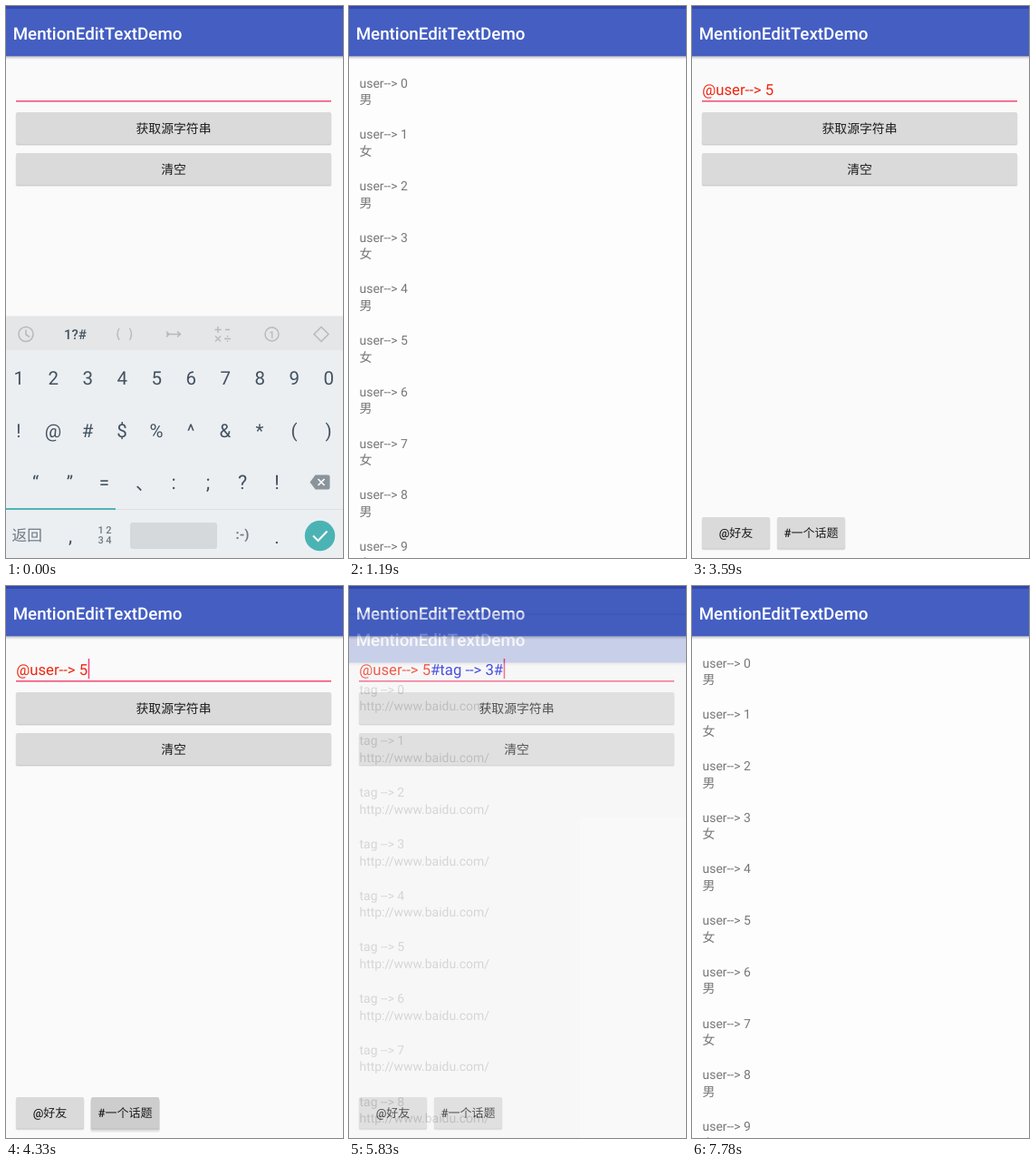
These frames come from a looping animation (372 px wide and 608 px high, 8 s). An HTML page:

```html
<!DOCTYPE html>
<html lang="zh-CN">
<head>
<meta charset="utf-8">
<style>
  html, body { margin: 0; width: 100%; height: 100%; overflow: hidden; background: #fafafa; }
  svg {
    display: block; text-rendering: geometricPrecision;
    font-family: Roboto, "Noto Sans CJK SC", "Noto Sans CJK", sans-serif;
  }
</style>
</head>
<body>
<svg id="stage" width="372" height="608" viewBox="0 0 372 608"></svg>
<script>
const stage = document.getElementById('stage');

const text = (x, y, size, str, fill, more = '') =>
  `<text x="${x}" y="${y}" font-size="${size}" fill="${fill}" ${more}>${str}</text>`;
const mid = (x, y, size, str, fill, more = '') =>
  text(x, y, size, str, fill, 'text-anchor="middle" ' + more);
const rect = (x, y, w, h, fill, more = '') =>
  `<rect x="${x}" y="${y}" width="${w}" height="${h}" fill="${fill}" ${more}/>`;
const line = (d, color, width = 1.3) =>
  `<path d="${d}" fill="none" stroke="${color}" stroke-width="${width}"/>`;

const header = () =>
  rect(0, 55, 372, 4, 'url(#shade)') + rect(0, 0, 372, 55.3, '#445ec2') +
  rect(0, 0, 372, 3, '#3349ab') +
  text(7.7, 37, 18.75, 'MentionEditTextDemo', '#fff', 'font-weight="500"');

const button = (x, y, w, h, label, size, id = '') =>
  rect(x - .5, y + 1, w + 1, h + 1, '#000', 'rx="2" opacity=".07"') +
  rect(x, y + .5, w, h + .5, '#000', 'rx="2" opacity=".12"') +
  rect(x, y, w, h, '#dadada', 'rx="2"') +
  (id && `<g id="${id}" opacity="0">` +
    rect(x - 1, y + 2, w + 2, h + 2, '#000', 'rx="3" opacity=".13"') +
    rect(x, y, w, h, '#c6c6c6', 'rx="2"') + '</g>') +
  mid(x + w / 2, y + h / 2 + size * .37, size, label, '#1c1c1c', 'font-weight="500"');

const list = (id, first, second) => {
  let rows = '';
  for (let i = 0; i < 10; i++) {
    const y = 89.5 + i * 56.72;
    rows += text(11.5, y, 13.94, first + i, '#777') + text(11.5, y + 18.6, 13.94, second(i), '#777');
  }
  return `<g id="${id}" opacity="0">${rect(0, 0, 372, 608, '#fdfdfd')}${rows}${header()}</g>`;
};

function keyboard() {
  const ink = '#435261', soft = '#b4babe', dim = '#6d7983';
  const keys = (chars, x, y, size) => chars.map((c, i) => mid(x + i * 38, y, size, c, ink)).join('');
  return rect(0, 341, 372, 1, '#000', 'opacity=".04"') +
    rect(0, 342, 372, 266, '#eceff2') + rect(0, 342, 372, 37, '#e4e6e8') +
    // tool strip
    `<circle cx="22" cy="361.5" r="8" fill="none" stroke="${soft}" stroke-width="1.5"/>` +
    line('M22 356.5V362L26 364.5', soft, 1.5) +
    mid(76.5, 367, 15, '1?#', ink, 'font-weight="500"') +
    line('M125 355q-4 6.5 0 13M136.5 355q4 6.5 0 13', soft) +
    line('M177 358.5l3 3-3 3M177 361.5H192M189 358.5l3.5 3-3.5 3', soft, 1.5) +
    line('M230.5 356.5h7M234 353v7M242 356.5h5M231 363.5l6 6M237 363.5l-6 6M241 366.5h7M244.5 363v1.5M244.5 368.5v1.5', soft) +
    `<circle cx="293.5" cy="361.5" r="7.5" fill="none" stroke="${soft}" stroke-width="1.4"/>` +
    mid(293.5, 365.5, 11, '1', soft, 'font-weight="500"') +
    line('M348 353.5l8 8-8 8-8-8z', soft, 1.5) +
    // key rows
    keys([...'1234567890'], 14.2, 417, 20.5) +
    keys(['!', '@', '#', '$', '%', '^', '&amp;', '*', '(', ')'], 14, 475, 20.5) +
    keys(['“', '”', '='], 32.5, 532, 20.5) + text(143, 533, 20, '、', ink) +
    keys([':', ';', '?', '!'], 185, 532, 21.5) +
    `<path d="M335.5 524.5l6-8h14q2 0 2 2v12q0 2-2 2h-14z" fill="#8a949b"/>` +
    line('M344.5 521l7 7M351.5 521l-7 7', '#fff', 1.7) +
    // bottom row
    rect(0, 554, 372, 1, '#dde1e4') + rect(0, 553, 121, 2, '#4fb6b7') +
    text(6.5, 589, 16.7, '返回', dim) + mid(71, 591, 21, ',', ink) +
    mid(109, 581, 11, '1 2', dim, 'font-weight="500"') +
    mid(109, 592, 11, '3 4', dim, 'font-weight="500"') +
    rect(137, 569, 96, 29, '#d5d9dc', 'rx="3"') +
    mid(261, 587, 14.5, ':-)', dim, 'font-weight="700"') + mid(299, 592, 21, '.', ink) +
    `<circle cx="346.5" cy="583.5" r="16.7" fill="#4cb3b5"/>` +
    line('M339 583.5l5.5 5.5 10-10.5', '#fff', 2);
}

stage.innerHTML =
  `<defs><linearGradient id="shade" x2="0" y2="1"><stop stop-opacity=".24"/><stop offset="1" stop-opacity="0"/></linearGradient></defs>` +
  rect(0, 0, 372, 608, '#fafafa') + header() +
  `<text x="11.3" y="97.5" font-size="16.7"><tspan id="user" fill="#f0260f"></tspan><tspan id="tag" fill="#0a14dc"></tspan></text>` +
  rect(11, 104, 348, 1.6, '#f4547f') + rect(0, 80, 1.5, 22, '#f4407a', 'id="caret"') +
  button(11, 117, 348, 35, '获取源字符串', 13.85) + button(11, 162, 348, 35, '清空', 13.85) +
  button(11, 563, 75, 34.5, '@好友', 13, 'press0') + button(94, 563, 75, 34.5, '#一个话题', 13, 'press1') +
  `<g id="keys">${keyboard()}</g>` +
  rect(0, 0, 372, 608, '#000', 'id="dim" opacity="0"') +
  list('users', 'user--&gt; ', i => i % 2 ? '女' : '男') +
  list('tags', 'tag --&gt; ', () => 'http://www.baidu.com/');

const $ = id => document.getElementById(id);
const clamp = v => Math.min(1, Math.max(0, v));
const place = (id, y, alpha) => {
  $(id).setAttribute('transform', `translate(0 ${y})`);
  $(id).setAttribute('opacity', alpha);
};

// The screen refreshes in 150 ms ticks
const snap = t => {
  if (t < 440) return 0;
  const from = t < 4630 ? 440 : 4630;
  return from + Math.floor((t - from) / 150) * 150;
};

const opened = [1190, 4630, 7780];
const closed = [2170, 5636];
const caretOn = [[440, 940], [2140, 2540], [3140, 3590], [4040, 4490], [5580, 6130], [6580, 7180]];

// A list rises and fades in, later drops and fades out
function slide(id, t, open, close) {
  if (t < close) {
    const dt = t - open + 290;
    place(id, 48.6 * (1 - clamp(dt / 350)) ** 5, 1 - (1 - clamp(dt / 200)) ** 2);
  } else {
    const dt = t - close;
    place(id, 48.6 * clamp(dt / 250) ** 2, clamp((224 - dt) / 120));
  }
}

const press = (t, end) => t < end + 150 ? clamp((t - end + 600) / 250) : 0;

// The main screen brightens while a list leaves
const dimming = (t, close) => t < close ? 0 : .3 * (1 - clamp((t - close) / 250)) ** 2;

function draw(t) {
  const hide = clamp((t - 360) / 200);
  place('keys', 60 * hide * hide, 1 - hide);

  const step = (t >= opened[0]) + (t >= opened[1]);
  $('user').textContent = step > 0 ? '@user--> 5' : '';
  $('tag').textContent = step > 1 ? '#tag --> 3#' : '';
  $('caret').setAttribute('x', [11.5, 90.7, 170.7][step]);
  $('caret').setAttribute('opacity', +caretOn.some(([a, b]) => t >= a && t < b));

  $('press0').setAttribute('opacity', Math.max(press(t, opened[0]), press(t, opened[2])));
  $('press1').setAttribute('opacity', press(t, opened[1]));
  $('dim').setAttribute('opacity', Math.max(...closed.map(c => dimming(t, c))));

  if (t < 5000) slide('users', t, opened[0], closed[0]);
  else slide('users', t, opened[2], Infinity);
  slide('tags', t, opened[1], closed[1]);
}

const start = performance.now();
function frame() {
  draw(snap((performance.now() - start) % 8000));
  requestAnimationFrame(frame);
}
frame();
</script>
</body>
</html>
```
